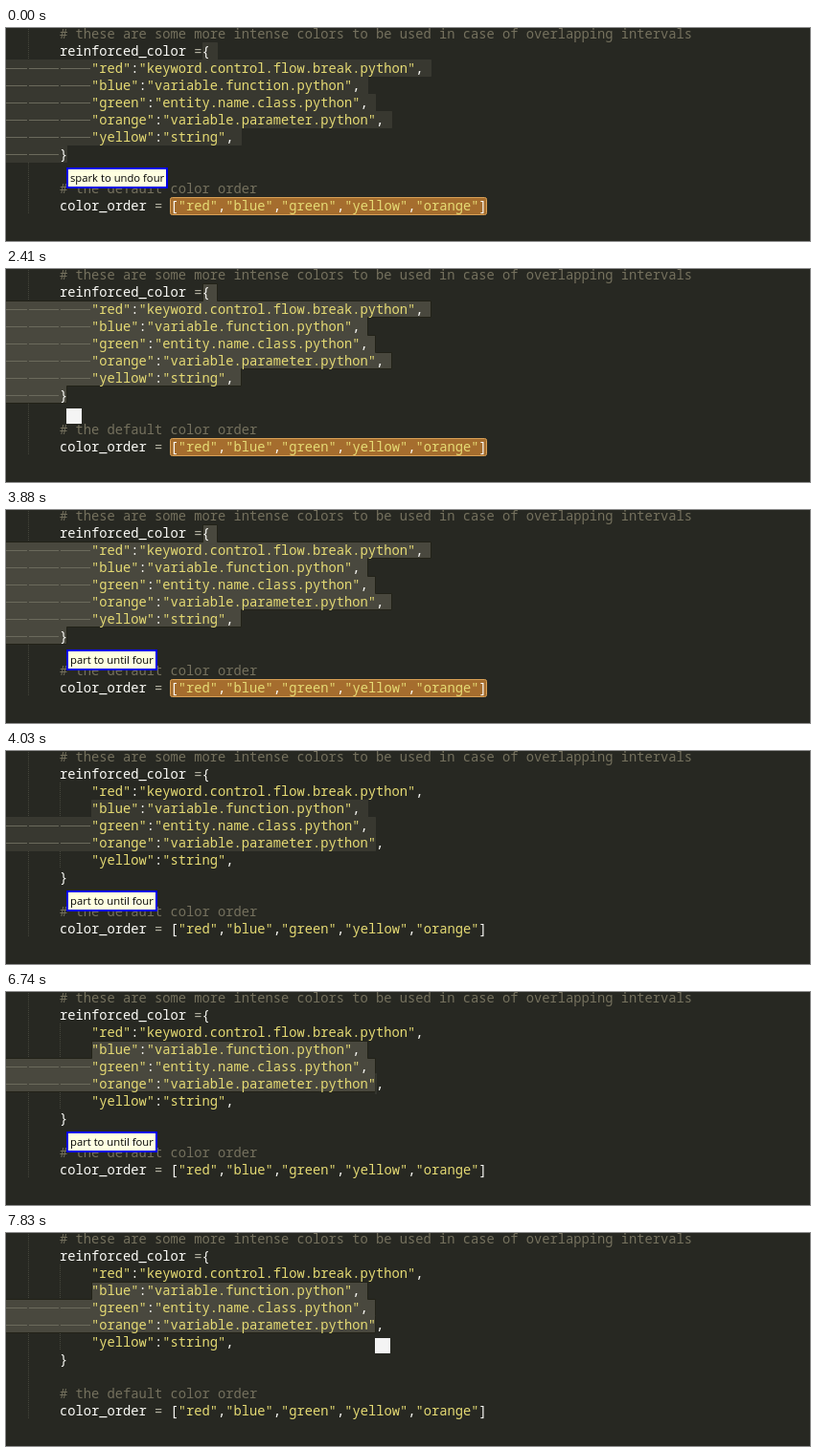
An HTML page for the animation above (8 s loop, 839 by 223 pixels).

```html
<!DOCTYPE html>
<html lang="en">
<head>
<meta charset="utf-8">
<title>Editing by voice</title>
<style>
  html, body { margin: 0; height: 100%; overflow: hidden; background: #272822; }
  svg { display: block; }
  text { white-space: pre; }
  .code { font: 500 13.75px "Noto Sans Mono", monospace; fill: #fcfcf8; }
  .string { fill: #e6db74; }
  .comment { fill: #75715e; font-weight: 400; }
  .operator { fill: #b4b2a2; }
  .guide { stroke: #45463c; stroke-dasharray: 1 1; }
  .selection { fill: #383830; stroke: #383830; stroke-linejoin: round; }
  .focused .selection { fill: #49483e; stroke: #222218; }
  .tab { stroke: #6b6a5c; }
  .match { fill: #a56d2e; stroke: #d9a055; }
  .tip rect { fill: #ffffe1; stroke: #0000e6; stroke-width: 2; }
  .tip text { font: 11.25px "Open Sans", sans-serif; fill: #000; }
</style>
</head>
<body>
<svg width="839" height="223" viewBox="0 0 839 223"></svg>
<script>
const LOOP = 8000, LEFT = 56, CHAR = 8.25, LINE = 18, TAB = 33;
const FOCUS = 1080, EDIT = 4030, REFOCUS = 4110;
const svg = document.querySelector('svg');

const lines = [
  '# these are some more intense colors to be used in case of overlapping intervals',
  'reinforced_color ={',
  '    "red":"keyword.control.flow.break.python",',
  '    "blue":"variable.function.python",',
  '    "green":"entity.name.class.python",',
  '    "orange":"variable.parameter.python",',
  '    "yellow":"string",',
  '}',
  '',
  '# the default color order',
  'color_order = ["red","blue","green","yellow","orange"]'
];

function add(parent, tag, attrs = {}, text = '') {
  const node = document.createElementNS('http://www.w3.org/2000/svg', tag);
  for (const key in attrs) node.setAttribute(key, attrs[key]);
  node.textContent = text;
  return parent.appendChild(node);
}

const show = (node, on) => node.setAttribute('visibility', on ? 'visible' : 'hidden');
const column = n => Math.round(LEFT + n * CHAR);
const rowTop = row => row * LINE - 3;

// Selects from one line and column to another; tabs inside it appear as dashes.
function addSelection(first, from, last, to) {
  const group = add(svg, 'g');
  const left = column(from) + .5, top = rowTop(first) + .5;
  const rightEdge = row => column(row === last ? to : lines[row].length + 1) - .5;
  const outline = add(group, 'path', { class: 'selection' });
  let d = `M${left} ${top}`;
  for (let row = first; row <= last; row++) {
    // The border lies inside the wider of two neighbouring rows.
    const widens = row < last && rightEdge(row + 1) > rightEdge(row);
    d += `H${rightEdge(row)}V${rowTop(row + 1) + (widens ? .5 : -.5)}`;
    if (row === first) continue;
    const y = rowTop(row) + 9.5;
    const indent = LEFT + (lines[row].startsWith(' ') ? TAB : 0);
    for (let stop = LEFT - TAB; stop <= indent; stop += TAB) {
      add(group, 'path', { class: 'tab', d: `M${stop - TAB + 1} ${y}H${stop - 1}` });
    }
  }
  outline.setAttribute('d', `${d}H-2V${top + LINE}H${left}Z`);
  return group;
}

function addLine(line, row) {
  const text = add(svg, 'text', { class: 'code', x: LEFT, y: rowTop(row) + 14 });
  for (const part of line.split(/(#.*|"[^"]*"|=)/)) {
    const kind = { '#': 'comment', '"': 'string', '=': 'operator' }[part[0]];
    add(text, 'tspan', kind ? { class: kind } : {}, part);
  }
}

function addTip(label, width) {
  const tip = add(svg, 'g', { class: 'tip' });
  add(tip, 'rect', { x: 1, y: 1, width: width - 2, height: 20 });
  add(tip, 'text', { x: 4, y: 15 }, label);
  return tip;
}

add(svg, 'path', { class: 'guide', d: 'M23.5 -1V195M56.5 33V123' });
const dictSelection = addSelection(1, 18, 7, 1);
const itemSelection = addSelection(3, 4, 5, 40);
const match = add(svg, 'rect', { class: 'match', x: 171.5, y: 177.5, width: 330, height: 18, rx: 2 });
lines.forEach(addLine);
const caret = add(svg, 'rect', { width: 2, height: 22, fill: '#f8f8f2' });
const undoTip = addTip('spark to undo four', 106);
const partTip = addTip('part to until four', 95);
const icon = add(svg, 'rect', { width: 16, height: 16, fill: '#f4f4f4' });

// Solid until the first peak, then fades out and in around every further one.
function blink(t, peak) {
  const period = 1050, since = Math.max(0, t - peak) % period;
  const distance = Math.min(since, period - since);
  return Math.max(0, Math.min(1, (250 - distance) / 150));
}

function draw(t) {
  const edited = t >= EDIT;
  const focused = t >= FOCUS && !(edited && t < REFOCUS);
  svg.classList.toggle('focused', focused);
  show(dictSelection, !edited);
  show(match, !edited);
  show(itemSelection, edited);

  show(caret, focused);
  caret.setAttribute('x', edited ? 385 : 63);
  caret.setAttribute('y', edited ? 85 : 121);
  caret.setAttribute('opacity', blink(t, edited ? 4400 : FOCUS));

  const place = t < 7220 ? 'translate(63 146)' : 'translate(385 110)';
  for (const node of [undoTip, partTip, icon]) node.setAttribute('transform', place);
  show(undoTip, t < 2090);
  show(partTip, t >= 3880 && t < 7370);
  show(icon, t >= 2090 && t < 3880 || t >= 7370);
}

const start = performance.now();
function tick() {
  draw((performance.now() - start) % LOOP);
  requestAnimationFrame(tick);
}
tick();
</script>
</body>
</html>
```
